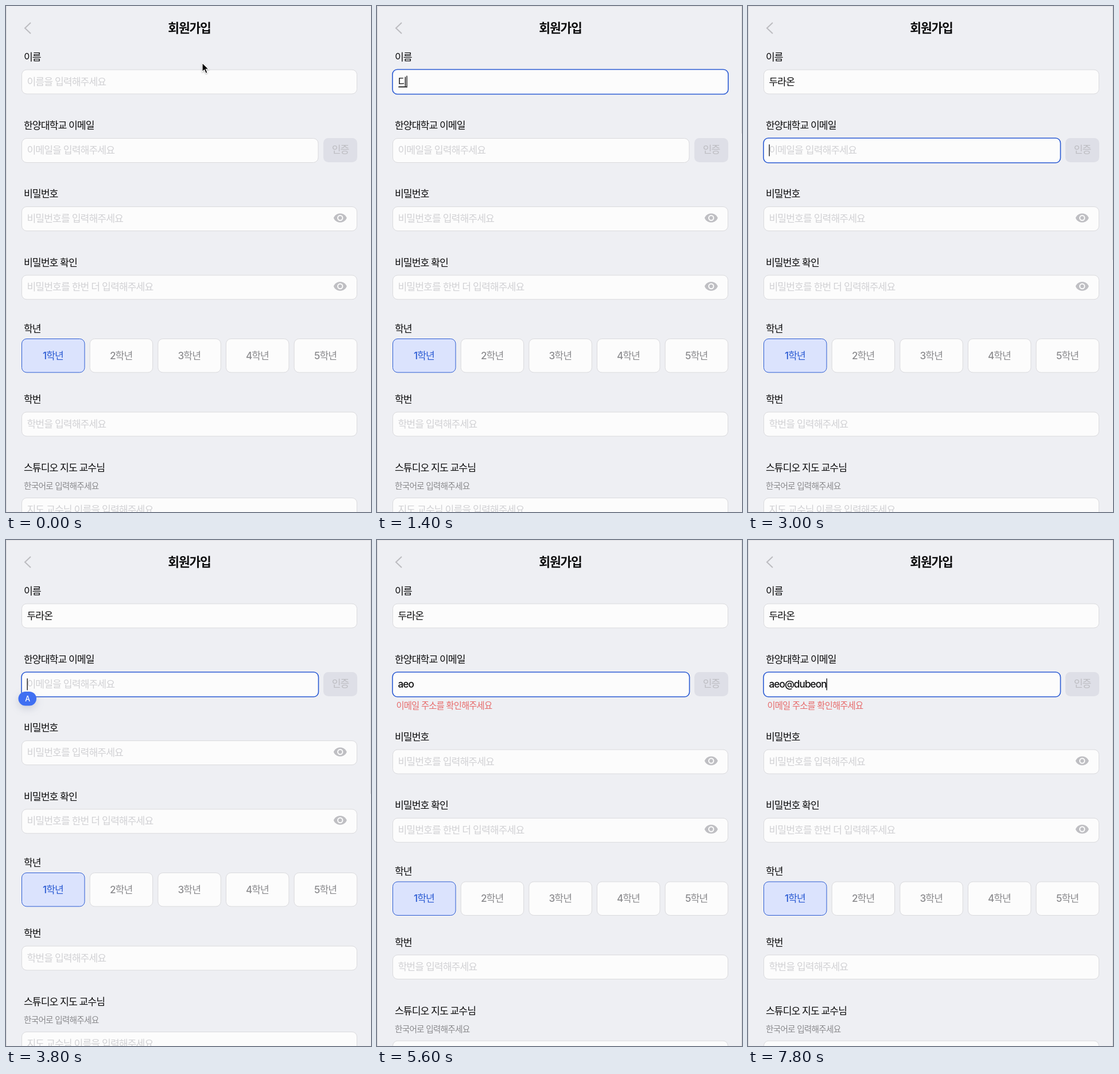
Recreate the animation shown at these times as an HTML page. Size 636 by 881 pixels, loop 8000 ms.

```html
<!DOCTYPE html>
<html lang="ko">
<head>
<meta charset="utf-8">
<title>회원가입</title>
<style>
  html, body { margin: 0; width: 100%; height: 100%; overflow: hidden; background: #eeeff3; }
  svg { display: block; width: 100%; height: 100%; }
  text { font-family: Inter, "Noto Sans CJK KR", "Noto Sans CJK", sans-serif; letter-spacing: -.055em; white-space: pre; }
</style>
</head>
<body>
<svg id="stage" viewBox="0 0 636 881"></svg>
<script>
const LOOP = 8000, SIZE = 17.2, INK = '#0b0b0c', BLUE = '#2b5bd3', PALE = '#d1d1d4', LINE = '#dadadd';
const stage = document.getElementById('stage');

function add(parent, tag, attrs, content = '') {
  const node = document.createElementNS('http://www.w3.org/2000/svg', tag);
  set(node, attrs);
  node.textContent = content;
  return parent.appendChild(node);
}
function set(node, attrs) {
  for (const key in attrs) node.setAttribute(key, attrs[key]);
}
const show = (node, visible) => set(node, { visibility: visible ? 'visible' : 'hidden' });

// Text placed by the middle of its Hangul glyphs
function label(parent, x, middle, content, { size = SIZE, fill = INK, weight = 500, anchor = 'start' } = {}) {
  return add(parent, 'text', { x, y: middle + size * .36, 'font-size': size, 'font-weight': weight,
    'text-anchor': anchor, fill }, content);
}
function box(parent, x, y, width, height, fill = '#fcfcfc', stroke = LINE) {
  return add(parent, 'rect', { x, y, width, height, rx: 8.5, fill, stroke });
}
function field(parent, y, hint, width = 584) {
  const frame = box(parent, 27.5, y, width, 42);
  const placeholder = label(parent, 36.5, y + 20.5, hint, { fill: PALE, weight: 400 });
  const value = label(parent, 36.5, y + 20.5, '');
  return { frame, placeholder, value, y, width };
}
function eye(parent, y) {
  const icon = add(parent, 'g', { transform: `translate(582.3 ${y})`, fill: '#bfbfc3' });
  add(icon, 'path', { d: 'M-11.5 0C-7.5 -10.4 7.5 -10.4 11.5 0C7.5 10.4 -7.5 10.4 -11.5 0Z' });
  add(icon, 'circle', { r: 4.2, fill: 'none', stroke: '#fcfcfc', 'stroke-width': 2 });
}

// Window edges and header
add(stage, 'rect', { width: 636, height: 881, fill: '#eeeff3' });
add(stage, 'path', { d: 'M.5 0V881', stroke: '#d5d5d9' });
const topEdge = add(stage, 'path', { d: 'M0 .5H636', stroke: '#dfdfe3' });
const rightEdge = add(stage, 'path', { stroke: '#d5d5d9' });
add(stage, 'path', { d: 'M43 29L33 38.5L43 48', fill: 'none', stroke: '#bcbcc0', 'stroke-width': 2 });
label(stage, 319.5, 38, '회원가입', { size: 21.5, weight: 600, anchor: 'middle' });

label(stage, 31, 89, '이름');
const nameField = field(stage, 111, '이름을 입력해주세요');
label(stage, 31, 208, '한양대학교 이메일');
const mailField = field(stage, 230.5, '이메일을 입력해주세요', 516.5);
add(stage, 'rect', { x: 553, y: 230, width: 59, height: 42, rx: 8.5, fill: '#dedfe7' });
label(stage, 582.5, 250, '인증', { fill: '#bdbdc2', anchor: 'middle' });
const error = label(stage, 33.5, 288, '이메일 주소를 확인해주세요', { size: 15.4, fill: '#e76b6b', weight: 400 });

// Everything below the e-mail row moves down when the error appears
const lower = add(stage, 'g', {});
label(lower, 31, 327, '비밀번호');
field(lower, 349.5, '비밀번호를 입력해주세요');
eye(lower, 369);
label(lower, 31, 446.5, '비밀번호 확인');
field(lower, 468.8, '비밀번호를 한번 더 입력해주세요');
eye(lower, 488);
label(lower, 31, 561.5, '학년');
for (let i = 0; i < 5; i++) {
  const x = 27.5 + i * 118.65, chosen = i === 0;
  box(lower, x, 579.5, 109.5, 58.5, chosen ? '#dbe3fd' : undefined, chosen ? BLUE : undefined);
  label(lower, x + 54.5, 608.5, `${i + 1}학년`, { fill: chosen ? BLUE : '#8b8b8e', anchor: 'middle' });
}
label(lower, 31, 685, '학번');
field(lower, 707, '학번을 입력해주세요');
label(lower, 31, 804, '스튜디오 지도 교수님');
label(lower, 31, 836, '한국어로 입력해주세요', { size: 14.7, fill: '#8b8b8e', weight: 400 });
field(lower, 856.5, '지도 교수님 이름을 입력해주세요');

const caret = add(stage, 'rect', { width: 1.3, height: 20.5, fill: INK });
const underline = add(stage, 'rect', { y: 140, width: 14, height: 1.6, fill: INK });

const badge = add(stage, 'g', {});
badge.style.filter = 'drop-shadow(0 5px 7px rgba(70, 80, 120, .2))';
add(badge, 'rect', { x: 21.5, y: 264, width: 31.5, height: 24.5, rx: 12.2, fill: '#3f6ff2' });
label(badge, 37.3, 276.5, 'A', { size: 12.5, fill: '#fff', anchor: 'middle' });

const pointer = add(stage, 'path', { d: 'M0 0V15.5L3.6 12.2L6.2 18.2L9 17L6.4 11.2H11.2Z',
  fill: '#000', stroke: '#fff', 'stroke-width': 1.2 });
pointer.style.filter = 'drop-shadow(0 1px 1px rgba(0, 0, 0, .3))';

// Each step changes the state from its time on
const start = { name: '', mail: '', focus: '', caret: true, composing: false, badge: false, pointer: [342, 99], edge: 0 };
const steps = [
  [200, { pointer: [334, 108] }],
  [400, { pointer: [322, 124] }],
  [600, { focus: 'name', pointer: null, edge: 222 }],
  [1200, { name: 'ㄷ', composing: true }],
  [1400, { name: '디' }],
  [1600, { name: '두' }],
  [1800, { name: '두라' }],
  [2000, { name: '두랑' }],
  [2000, { name: '두라오' }],
  [2400, { name: '두라온' }],
  [2800, { composing: false }],
  [3000, { focus: 'mail', edge: 442 }],
  [3400, { badge: true }],
  [4000, { mail: 'a', badge: false, edge: 881 }],
  [4200, { mail: 'ae' }],
  [4400, { mail: 'aeo' }],
  [4800, { caret: false }],
  [5200, { caret: true }],
  [5600, { caret: false }],
  [6000, { caret: true }],
  [6600, { mail: 'aeo@' }],
  [6800, { mail: 'aeo@d' }],
  [7000, { mail: 'aeo@du' }],
  [7400, { mail: 'aeo@dub' }],
  [7600, { mail: 'aeo@dube' }],
  [7800, { mail: 'aeo@dubeon' }],
];

function paintField(item, content, focused) {
  const grow = focused ? .5 : 0;
  item.value.textContent = content;
  show(item.placeholder, !content);
  set(item.frame, { x: 27.5 - grow, y: item.y - grow, width: item.width + 2 * grow, height: 42 + 2 * grow,
    stroke: focused ? BLUE : LINE, 'stroke-width': focused ? 1.6 : 1 });
}

function render(time) {
  const state = Object.assign({}, start, ...steps.filter(([at]) => at <= time).map(([, change]) => change));
  paintField(nameField, state.name, state.focus === 'name');
  paintField(mailField, state.mail, state.focus === 'mail');

  const active = state.focus === 'mail' ? mailField : nameField;
  const end = 36.5 + (active.value.textContent ? active.value.getComputedTextLength() : 0);
  set(caret, { x: end, y: active.y + 10.5 });
  set(underline, { x: end - 14 });
  show(caret, state.focus && state.caret);
  show(underline, state.composing);

  show(error, state.mail);
  set(lower, { transform: `translate(0 ${state.mail ? 15.5 : 0})` });
  show(badge, state.badge);
  show(pointer, state.pointer);
  if (state.pointer) set(pointer, { transform: `translate(${state.pointer})` });
  show(topEdge, state.edge);
  set(rightEdge, { d: `M635.5 0V${state.edge}` });
}

const origin = performance.now();
function tick() {
  render((performance.now() - origin) % LOOP);
  requestAnimationFrame(tick);
}
tick();
</script>
</body>
</html>
```
